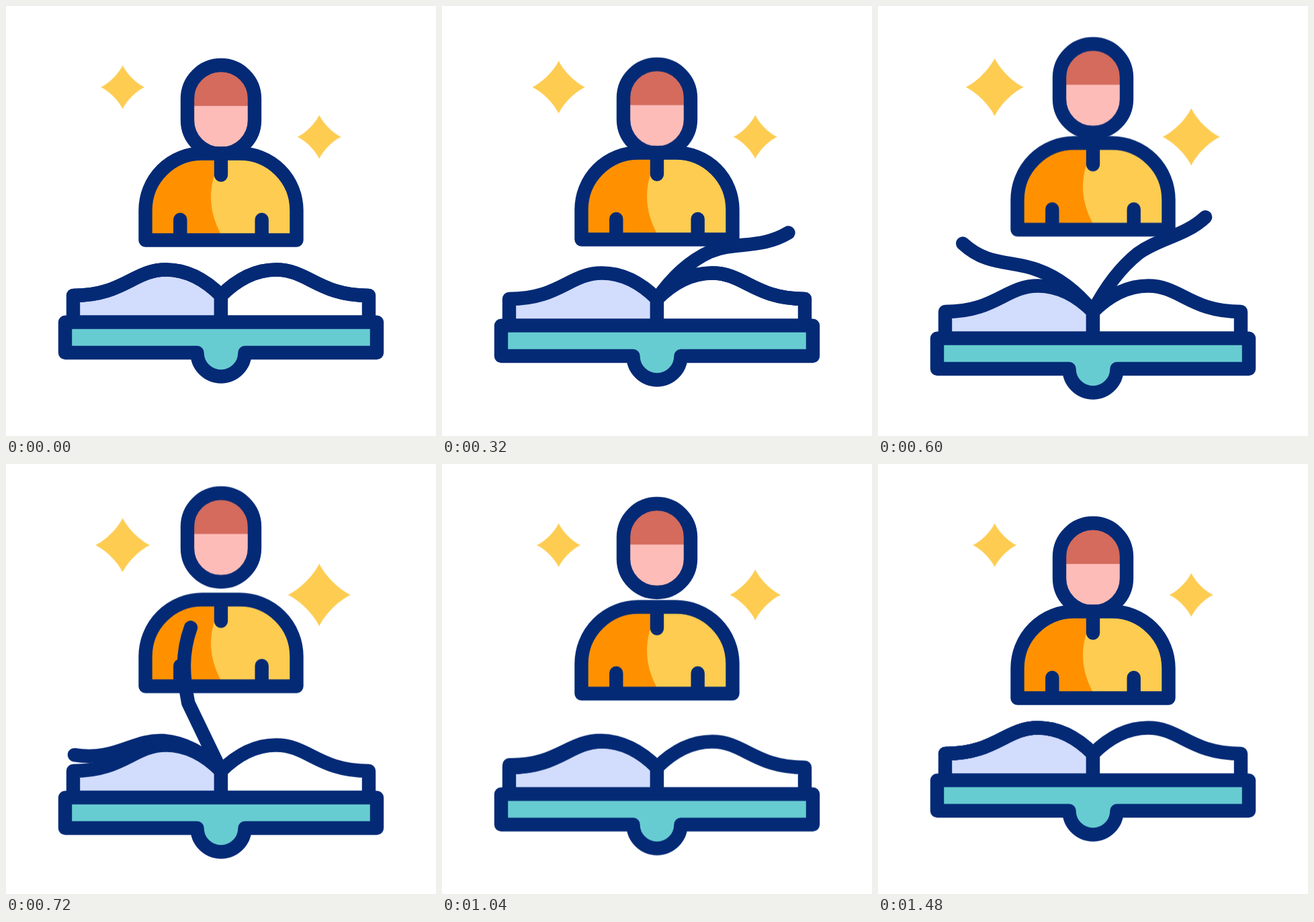
Animation, 640 px wide and 640 px high, one loop 1560 ms. Source, as an HTML page:

```html
<!DOCTYPE html>
<html lang="en">
<head>
<meta charset="utf-8">
<title>Reader</title>
<style>
  html, body { margin: 0; width: 100%; height: 100%; overflow: hidden; background: #fff; }
  svg { display: block; width: 100%; height: 100%; }
  .line { stroke: #042a76; stroke-width: 20.4; stroke-linecap: round; stroke-linejoin: round; }
  .open { fill: none; }
  .star { fill: #fdcc51; }

  .head, .body, .book, .star, .page { animation: 1560ms linear infinite; }
  .head { animation-name: head; }
  .body { animation-name: body; }
  .book { animation-name: book; }
  .star.a { animation-name: twinkle-a; }
  .star.b { animation-name: twinkle-b; }
  .page { animation-name: flip; }
  .page.late { animation-delay: -1320ms; }

  @keyframes book {
    0% { transform: none; animation-timing-function: cubic-bezier(.73, 0, .42, 1); }
    50% { transform: translateY(26px); animation-timing-function: cubic-bezier(.6, 0, .26, 1); }
    100% { transform: none; }
  }
  @keyframes body {
    0% { transform: none; }
    10.6% { transform: none; animation-timing-function: cubic-bezier(.74, 0, .42, 1); }
    49% { transform: translateY(-17.8px); animation-timing-function: cubic-bezier(.6, 0, .2, 1); }
    87.2%, 100% { transform: none; }
  }
  @keyframes head {
    0% { transform: none; }
    12.8% { transform: none; animation-timing-function: cubic-bezier(.77, 0, .5, 1); }
    51.3% { transform: translateY(-46px); animation-timing-function: cubic-bezier(.6, 0, .25, 1); }
    89.7%, 100% { transform: none; }
  }
  @keyframes twinkle-a {
    0% { transform: scale(1); }
    2.6% { transform: scale(1); animation-timing-function: cubic-bezier(.37, 0, .63, 1); }
    34.6% { transform: scale(1.34); animation-timing-function: cubic-bezier(.37, 0, .63, 1); }
    66.7%, 100% { transform: scale(1); }
  }
  @keyframes twinkle-b {
    0% { transform: scale(1); }
    20.5% { transform: scale(1); animation-timing-function: cubic-bezier(.37, 0, .63, 1); }
    48.7% { transform: scale(1.44); animation-timing-function: cubic-bezier(.37, 0, .63, 1); }
    79.5%, 100% { transform: scale(1); }
  }
</style>
</head>
<body>
<svg viewBox="0 0 640 640">
  <defs>
    <path id="star" d="M0-32.5C6-20 20-6 32.5 0C20 6 6 20 0 32.5C-6 20-20 6-32.5 0C-20-6-6-20 0-32.5Z"/>
    <path id="half" class="line" d="M320 431C343 408 370 392.5 402 392.5C450 392.5 465 431 540 431V470.6H320Z"/>
  </defs>
  <g transform="translate(173.6 120.8)"><use href="#star" class="star a"/></g>
  <g transform="translate(466.2 194.8)"><use href="#star" class="star b"/></g>

  <g class="head">
    <rect x="270" y="88" width="100" height="132" rx="50" fill="#fdbcb8"/>
    <path d="M270 148.7V138a50 50 0 0 1 100 0V148.7Z" fill="#d46b5c"/>
    <rect class="line open" x="270" y="88" width="100" height="132" rx="50"/>
  </g>

  <g class="body">
    <path d="M207.5 348.5V304A84.5 84.5 0 0 1 292 219.5H348A84.5 84.5 0 0 1 432.5 304V348.5Z" fill="#ff9100"/>
    <path d="M320 219.5V230C300 265 300 303 320 340V348.5H432.5V304A84.5 84.5 0 0 0 348 219.5Z" fill="#fdcc51"/>
    <path class="line open" d="M207.5 348.5V304A84.5 84.5 0 0 1 292 219.5H348A84.5 84.5 0 0 1 432.5 304V348.5ZM320 220V251.5M259.3 318V348.5M380.7 318V348.5"/>
  </g>

  <g class="book">
    <use href="#half" fill="#d2dcfd" transform="matrix(-1 0 0 1 640 0)"/>
    <use href="#half" fill="#fff"/>
    <path class="line" fill="#67ccd1" d="M88 470.6H552V516H355.5A35.5 35.5 0 0 1 284.5 516H88Z"/>
    <path class="line open page"/>
    <path class="line open page late"/>
  </g>
</svg>
<script>
  const LOOP = 1560, START = 80, END = 860, STEP = 20;
  const SPINE = [320, 431];

  // Control points of a page lying on the right, as offsets from the spine.
  const FLAT = [[23, 23], [50, 38.5], [82, 38.5], [130, 38.5], [145, 0], [220, 0]];

  const mix = (a, b, w) => a + (b - a) * w;

  // cubic-bezier(a, 0, b, 1)
  function ease(x, a, b) {
    let lo = 0, hi = 1;
    for (let i = 0; i < 30; i++) {
      const s = (lo + hi) / 2, r = 1 - s;
      if (3 * r * r * s * a + 3 * r * s * s * b + s ** 3 < x) lo = s; else hi = s;
    }
    return lo * lo * (3 - 2 * lo);
  }

  // Each point swings over the spine, the tip trailing; the page straightens on the way.
  function pageAt(u) {
    const pts = FLAT.map(([x, y], i) => {
      const k = i + 1;
      const turn = ease(u, .78 - .033 * k, .064 * k);
      const rest = Math.atan2(y, x);
      const angle = mix(rest, Math.PI - rest, turn);
      const taut = Math.sqrt(Math.sin(Math.PI * turn));
      const reach = mix(Math.hypot(x, y), k * (40 - .6 * k), taut);
      return [SPINE[0] + reach * Math.cos(angle), SPINE[1] - reach * Math.sin(angle)]
        .map(n => n.toFixed(2)).join(" ");
    });
    return `M${SPINE.join(" ")}C${pts.join(" ")}`;
  }

  const frame = (t, u) => `${(t / LOOP * 100).toFixed(3)}%{d:path("${pageAt(u)}")}`;
  let rules = frame(0, 0);
  for (let t = START; t <= END; t += STEP) rules += frame(t, (t - START) / (END - START));
  rules += frame(LOOP, 1);

  const sheet = document.createElement("style");
  sheet.textContent = `@keyframes flip{${rules}}`;
  document.head.append(sheet);
</script>
</body>
</html>
```
